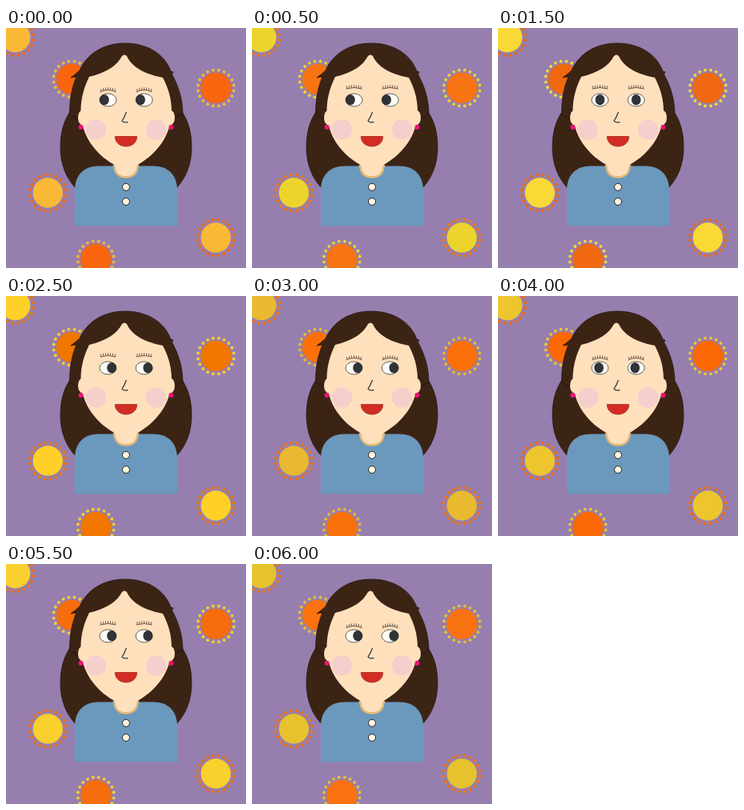
Animation, 300 px wide and 300 px high, one loop 6500 ms. Source, as an HTML page:

```html
<!DOCTYPE html>
<html lang="en">
<head>
<meta charset="utf-8">
<title>Portrait with suns</title>
<style>
html, body { margin: 0; width: 100%; height: 100%; overflow: hidden; background: #967fae; }
svg { display: block; width: 100vw; height: 100vh; }
</style>
</head>
<body>
<svg viewBox="0 0 300 300">
  <rect width="300" height="300" fill="#967fae"/>
  <g id="suns"></g>
  <g fill="#3c2415" stroke="#1d0f0a" stroke-width=".7">
    <path d="M82 102C72 115 68 131 68 149C68 170 75 188 88 201H212C225 188 232 170 232 149C232 131 228 115 218 102Z"/>
    <path d="M81 62Q88 57 92 53C102 31 123 19 149 19C176 19 198 32 206 54L209 55L207.500 58C216 73 221 90 221 108L205 116H95L79.500 108C79.500 90 82 75 88 61Z"/>
  </g>
  <path d="M86 247.500V203C86 184 97 172.500 116 172.500H184C203 172.500 214 184 214 203V247.500Z" fill="#6b98bd"/>
  <path d="M135 160H165V172Q164 187 150 187Q136 187 135 172Z" fill="#ffe0bd"/>
  <path d="M135 171Q136 186.500 150 186.500Q164 186.500 165 171" fill="none" stroke="#e0b873" stroke-width="2.5"/>
  <g fill="#ffe0bd">
    <ellipse cx="96" cy="112" rx="6" ry="9.500"/>
    <ellipse cx="205" cy="112" rx="6" ry="9.500"/>
    <path d="M145 35Q148 32 151 35C157 48 171 57 196 62C203 75 207 89 207 104C207 136 186 158 168 169Q159 175 150 175Q141 175 132 169C114 158 93.500 136 93.500 104C93.500 89 97 75 104 61C125 56 139 47 145 35Z"/>
  </g>
  <g fill="#f5cfcc">
    <circle cx="112.500" cy="127" r="12.800"/>
    <circle cx="187.500" cy="127" r="12.800"/>
  </g>
  <g fill="#f4117b">
    <circle cx="93.500" cy="124" r="3"/>
    <circle cx="206.500" cy="124" r="3"/>
  </g>
  <path d="M150.500 105Q148 112 145 116Q147 119 152.500 117.500" fill="none" stroke="#222" stroke-width="1.1"/>
  <path d="M136.300 135.500H163.700C163.700 143 158 148 150 148C142 148 136.300 143 136.300 135.500Z" fill="#d32c22" stroke="#94231c" stroke-width=".7"/>
  <g fill="#fff5df" stroke="#222" stroke-width="1">
    <circle cx="150" cy="198.800" r="4.500"/>
    <circle cx="150" cy="217" r="4.500"/>
  </g>
  <g id="eyes"></g>
</svg>
<script>
const STEP = 500, COUNT = 13;
const yellow = ['#f9b935', '#edd42d', '#f4c832', '#f9d935', '#edc52e', '#ffd028', '#e9b92f',
  '#f4c42d', '#edc52e', '#ffd028', '#f0c62d', '#f9d02d', '#e6c22f'];
const orange = ['#f8650e', '#f77412', '#f66b10', '#f0680f', '#f26d0a', '#f07600', '#f9700b',
  '#f56b0a', '#fa6806', '#ff6600', '#fa6a08', '#f56d0c', '#f87210'];
// -1 looks left, 1 looks right
const gaze = [-1, -1, 0, 0, 1, 1, 1, 1, -.3, -.3, -.3, 1, 1];

function add(parent, tag, attrs) {
  const el = document.createElementNS('http://www.w3.org/2000/svg', tag);
  for (const k in attrs) el.setAttribute(k, attrs[k]);
  return parent.appendChild(el);
}

function makeSun([x, y, warm]) {
  const g = add(document.getElementById('suns'), 'g', {});
  const disc = add(g, 'circle', { cx: x, cy: y, r: warm ? 19.2 : 18.7 });
  const dots = add(g, 'g', {});
  for (let i = 0; i < 20; i++) {
    const a = (i + .5) / 20 * Math.PI * 2;
    add(dots, 'circle', { cx: x + 22.6 * Math.cos(a), cy: y + 22.6 * Math.sin(a), r: 1.9 });
  }
  return { disc, dots, warm };
}

function makeEye(x) {
  const g = add(document.getElementById('eyes'), 'g', { transform: `translate(${x} 90)` });
  add(g, 'ellipse', { rx: 10.5, ry: 8, fill: '#fffdf8', stroke: '#222', 'stroke-width': .7 });
  const pupil = add(g, 'ellipse', { cy: -.3, rx: 5.5, ry: 6.3, fill: '#303338', stroke: '#111', 'stroke-width': .6 });
  const lash = add(g, 'path', { fill: 'none', stroke: '#33241a', 'stroke-width': .7 });
  return { pupil, lash };
}

function lashPath(low) {
  const base = low ? -10 : -14, arch = low ? 2.5 : 1.5;
  let d = `M-10 ${base}Q0 ${base - arch * 2} 10 ${base}`;
  for (let i = -3; i <= 3; i++) {
    const x = i * 2.8, y = base - arch * (1 - x * x / 100);
    d += `M${x} ${y}l${i * .25} -3.2`;
  }
  return d;
}

const suns = [[11.7, 11.7, 0], [82, 64, 1], [262.4, 75, 1], [52.3, 206, 0], [262.3, 262, 0], [112.3, 289, 1]].map(makeSun);
const eyes = [127.5, 172.7].map(makeEye);

function draw(n) {
  for (const s of suns) {
    s.disc.setAttribute('fill', (s.warm ? orange : yellow)[n]);
    s.dots.setAttribute('fill', (s.warm ? yellow : orange)[n]);
  }
  for (const e of eyes) {
    e.pupil.setAttribute('cx', gaze[n] * 4.6);
    e.lash.setAttribute('d', lashPath(n % 2 === 0));
  }
}

const start = performance.now();
function tick(now) {
  draw(Math.floor(Math.max(0, now - start) / STEP) % COUNT);
  requestAnimationFrame(tick);
}
draw(0);
requestAnimationFrame(tick);
</script>
</body>
</html>
```
